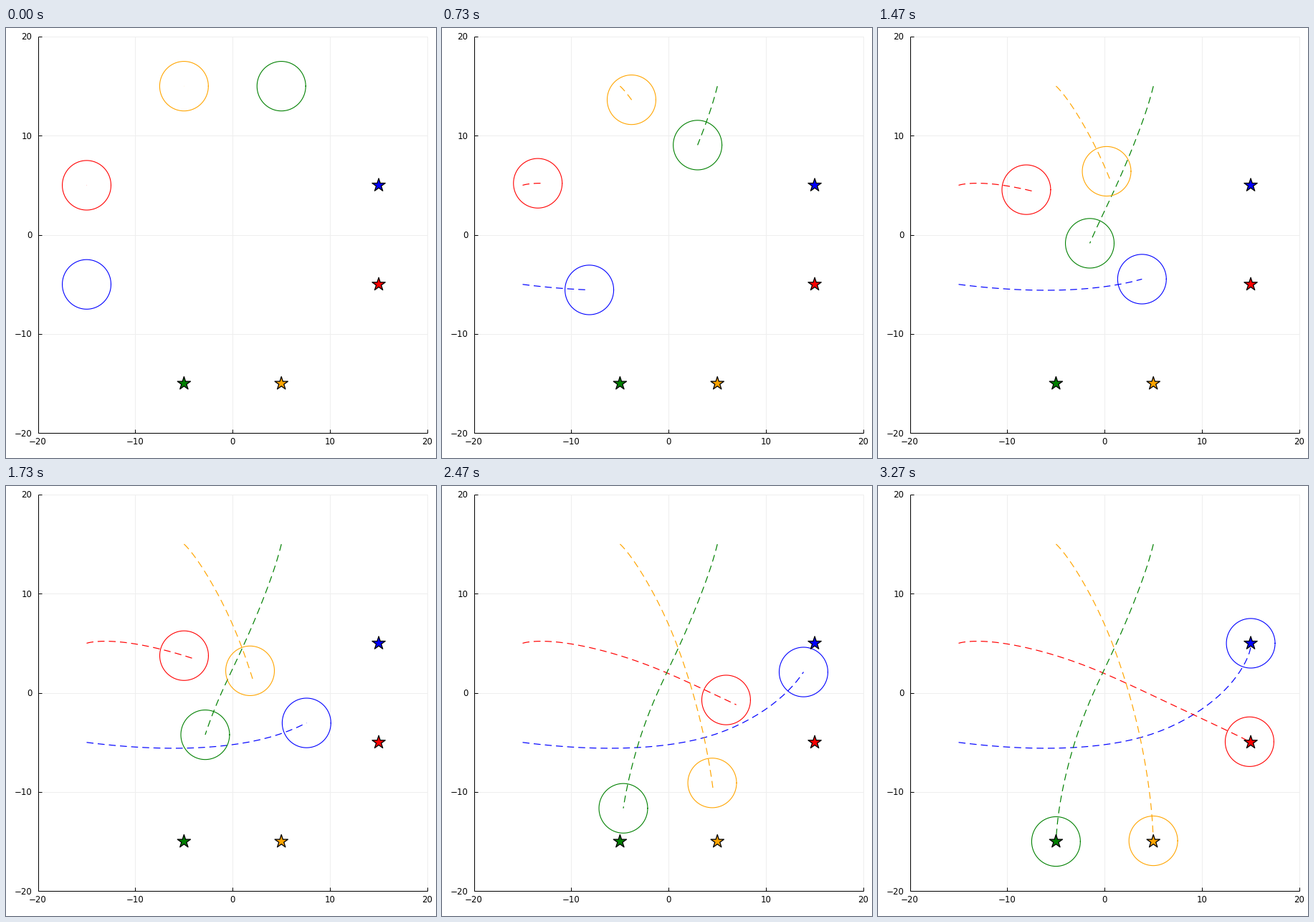
Animation, 600 px wide and 600 px high, one loop 3.34 s. Source, as a matplotlib script:

```python
import numpy as np
import matplotlib.pyplot as plt
from matplotlib.animation import FuncAnimation

SIZE, DPI = 600, 100
LOOP_MS, TICK_MS, STEPS_PER_S, LAST_STEP = 3340, 10, 15, 49
LEFT, RIGHT, TOP, BOTTOM = 44.6, 588.0, 12.0, 565.2
RADIUS = 2.5

# color, lead of the trail over the circle in steps, goal, waypoints (step, x, y)
AGENTS = [
    ("blue", 0, (15, 5),
     [(0, -15, -5), (6, -12.54, -5.27), (16, -2.76, -5.495), (22, 3.83, -4.47),
      (30, 10.58, -1.22), (37, 13.85, 2.10), (40, 14.58, 3.36), (49, 15, 5)]),
    ("red", 1, (15, -5),
     [(0, -15, 5), (6, -14.58, 5.10), (16, -11.505, 5.127), (22, -8.05, 4.555),
      (30, -1.36, 2.49), (37, 5.90, -0.72), (49, 14.88, -4.93), (50, 15, -5)]),
    ("green", 0, (-5, -15),
     [(0, 5, 15), (6, 4.37, 12.83), (16, 1.01, 4.56), (22, -1.53, -0.853),
      (30, -3.74, -7.30), (37, -4.66, -11.65), (40, -4.84, -13.03), (49, -5, -15)]),
    ("orange", 1, (5, -15),
     [(0, -5, 15), (6, -4.71, 14.72), (16, -2.275, 11.27), (22, 0.2, 6.41),
      (30, 3.09, -2.2), (37, 4.47, -9.09), (49, 4.995, -14.93), (50, 5, -15)]),
]


def points(px):
    return px * 72 / DPI


def to_px(xy):
    x, y = np.asarray(xy, float).T
    return np.column_stack([LEFT + (x + 20) / 40 * (RIGHT - LEFT),
                            TOP + (20 - y) / 40 * (BOTTOM - TOP)])


def rest_to_rest_spline(waypoints):
    """Cubic spline with zero end speeds, sampled at every whole step."""
    data = np.array(waypoints, float)
    t, p = data[:, 0], data[:, 1:]
    h = np.diff(t)[:, None]
    d = np.diff(p, axis=0) / h
    n = len(t)
    a, b = np.eye(n), np.zeros((n, 2))
    for i in range(1, n - 1):
        u, v = 1 / h[i - 1, 0], 1 / h[i, 0]
        a[i, i - 1:i + 2] = u, 2 * (u + v), v
        b[i] = 3 * (d[i - 1] * u + d[i] * v)
    m = np.linalg.solve(a, b)
    s = np.arange(t[-1] + 1)
    i = np.clip(np.searchsorted(t, s, side="right") - 1, 0, n - 2)
    w = (s[:, None] - t[i, None]) / h[i]
    return ((1 + 2 * w) * (1 - w) ** 2 * p[i] + w * (1 - w) ** 2 * h[i] * m[i]
            + w ** 2 * (3 - 2 * w) * p[i + 1] + w ** 2 * (w - 1) * h[i] * m[i + 1])


def star(center, radius):
    angle = np.arange(10) * np.pi / 5
    r = np.where(np.arange(10) % 2, 0.382, 1) * radius
    return np.column_stack([center[0] + r * np.sin(angle),
                            center[1] - r * np.cos(angle)])


fig = plt.figure(figsize=(SIZE / DPI, SIZE / DPI), dpi=DPI, facecolor="white")
ax = fig.add_axes([0, 0, 1, 1])
ax.set(xlim=(0, SIZE), ylim=(SIZE, 0))
ax.axis("off")


def stroke(xs, ys, color="black", width=1.0, z=2):
    ax.plot(xs, ys, color=color, lw=points(width), zorder=z,
            solid_capstyle="butt")


def label(x, y, value, **align):
    ax.text(x, y, str(value).replace("-", "\u2212"), family="DejaVu Sans",
            fontsize=points(11.8), color="black", **align)


for value in range(-20, 21, 10):
    x, y = to_px([(value, value)])[0]
    stroke([x, x], [TOP, BOTTOM], "#eeeeee", z=1)
    stroke([LEFT, RIGHT], [y, y], "#eeeeee", z=1)
    stroke([x, x], [BOTTOM, BOTTOM - 5])
    stroke([LEFT, LEFT + 5], [y, y])
    label(x, 581, value, ha="center", va="baseline")
    label(36.5, y + 4.3, value, ha="right", va="baseline")
stroke([LEFT, LEFT], [TOP, BOTTOM])
stroke([LEFT, RIGHT], [BOTTOM, BOTTOM])

turn = np.linspace(0, 2 * np.pi, 101)
ring_shape = RADIUS * np.column_stack([np.cos(turn), np.sin(turn)])

movers = []
for color, lead, goal, waypoints in AGENTS:
    trail, = ax.plot([], [], color=color, lw=points(1.2), dashes=(8, 5), zorder=3)
    ring, = ax.plot([], [], color=color, lw=points(1.1), zorder=3)
    ax.add_patch(plt.Polygon(star(to_px([goal])[0], 9.6), facecolor=color,
                             edgecolor="black", lw=points(1.3),
                             joinstyle="round", zorder=4))
    movers.append((rest_to_rest_spline(waypoints), lead, trail, ring))


def update(frame):
    step = min((frame * TICK_MS + 5) * STEPS_PER_S // 1000, LAST_STEP)
    artists = []
    for path, lead, trail, ring in movers:
        trail.set_data(*to_px(path[:step + lead + 1]).T)
        ring.set_data(*to_px(path[step] + ring_shape).T)
        artists += [trail, ring]
    return artists


anim = FuncAnimation(fig, update, frames=LOOP_MS // TICK_MS, interval=TICK_MS,
                     repeat=True, repeat_delay=0)
plt.show()
```
